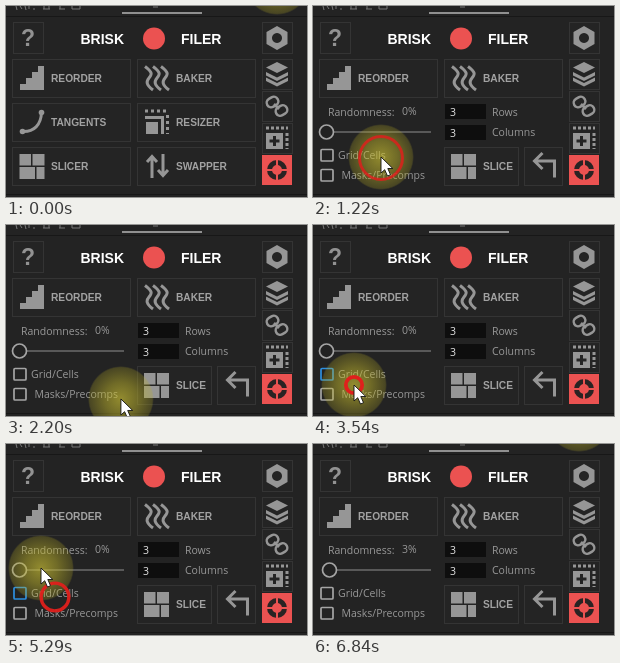
Write an HTML page that moves like this. It is 301 px wide and 191 px high and loops after 6940 ms.

```html
<!DOCTYPE html>
<html lang="en">
<head>
<meta charset="utf-8">
<title>Tool panel</title>
<style>
html, body { margin: 0; width: 100%; height: 100%; overflow: hidden; background: #232323; }
svg { display: block; width: 100vw; height: 100vh; }
text { font: 10.5px "Open Sans", "Noto Sans", sans-serif; fill: #989898; }
.label { font: bold 10.2px "Liberation Sans", Arial, sans-serif; fill: #a2a2a2; }
.title { font: bold 14px "Liberation Sans", Arial, sans-serif; fill: #fff; }
.help { font: bold 23px "Liberation Sans", Arial, sans-serif; fill: #929292; }
.field { fill: #e4e4e4; }
.btn { fill: #242424; stroke: #343434; }
.icon { fill: #969696; }
.line { fill: none; stroke: #969696; stroke-width: 3; }
.box { fill: #222; stroke: #a5a5a5; stroke-width: 1.7; }
</style>
</head>
<body>
<svg viewBox="0 0 301 191">
  <defs>
    <radialGradient id="shine">
      <stop offset="0" stop-color="#cdc236" stop-opacity=".66"/>
      <stop offset=".5" stop-color="#c4b92c" stop-opacity=".48"/>
      <stop offset=".95" stop-color="#bcb024" stop-opacity=".25"/>
      <stop offset="1" stop-color="#bcb024" stop-opacity="0"/>
    </radialGradient>
    <path id="tiles" d="M0 0h11.500v11.500h-11.500zM13 0h12v11.500h-12zM0 13h15.500v12h-15.500zM17 13h8v12h-8z"/>
  </defs>
  <rect width="301" height="191" fill="#232323"/>

  <!-- window edges -->
  <path d="M0 10.500H301M0 188.500H301" stroke="#171717"/>
  <path d="M10 0l1 4M14 0l2 3M19 0l1 4M23 0v3M28 2v2M37 3h7M38 0v3M43 0v3M53 3h6M54 0v3M66 3h8M66 0v3M74 0v3M147 1h5" stroke="#777"/>
  <path d="M116 7h80" stroke="#b4b4b4" stroke-width="1.600"/>

  <!-- header -->
  <rect class="btn" x="7.500" y="16.500" width="30" height="31"/>
  <text class="help" x="22" y="40" text-anchor="middle">?</text>
  <text class="title" x="118" y="38" text-anchor="end">BRISK</text>
  <circle cx="148" cy="32.500" r="11" fill="#eb5251"/>
  <text class="title" x="175" y="38">FILER</text>

  <!-- side bar -->
  <rect class="btn" x="256.500" y="16.500" width="30" height="31"/>
  <rect class="btn" x="256.500" y="53.500" width="30" height="30"/>
  <rect class="btn" x="256.500" y="85.500" width="30" height="30"/>
  <rect class="btn" x="256.500" y="117.500" width="30" height="30"/>
  <rect x="256" y="149" width="30" height="30" fill="#eb5251"/>
  <path class="icon" fill-rule="evenodd" d="M271 20l10.500 6v12l-10.500 6l-10.500-6v-12zM271 27a5 5 0 1 0 .01 0z"/>
  <g class="icon">
    <path d="M271 56l11 5.500l-11 5.500l-11-5.500z"/>
    <path id="sheet" d="M260 66l11 5.500l11-5.500v3.500l-11 5.500l-11-5.500z"/>
    <use href="#sheet" y="5.500"/>
  </g>
  <g class="line" style="stroke-width:2.500">
    <rect x="-6" y="-4.500" width="12" height="9" rx="4.500" transform="translate(266.500 96) rotate(-30)"/>
    <rect x="-6" y="-4.500" width="12" height="9" rx="4.500" transform="translate(275.500 104.500) rotate(-30)"/>
    <path d="M268 98l5 5"/>
  </g>
  <path class="line" stroke-dasharray="3 2" d="M260 122H282M281 127V143"/>
  <path class="icon" fill-rule="evenodd" d="M260 127h17v16h-17zM267 130v3.500h-3.500v3h3.500v3.500h3v-3.500h3.500v-3h-3.500v-3.500z"/>
  <circle cx="271" cy="164" r="7.500" fill="none" stroke="#292323" stroke-width="5"/>
  <path d="M271 153v7M271 168v7M260 164h7M275 164h7" stroke="#eb5251" stroke-width="2"/>

  <!-- first row of tools -->
  <rect class="btn" x="6.500" y="53.500" width="118" height="38"/>
  <rect class="btn" x="131.500" y="53.500" width="118" height="38"/>
  <path class="icon" d="M14 84v-6h6v-6h6v-6h6v-6h6v24z"/>
  <g class="line">
    <path id="wave" d="M139 60.500c8 6 7 8 4 11.500s-3 7 4 12"/>
    <use href="#wave" x="8"/>
    <use href="#wave" x="16"/>
  </g>
  <text class="label" x="45" y="76">REORDER</text>
  <text class="label" x="170" y="76">BAKER</text>

  <g id="menu">
    <rect class="btn" x="6.500" y="97.500" width="118" height="38"/>
    <rect class="btn" x="131.500" y="97.500" width="118" height="38"/>
    <rect class="btn" x="6.500" y="141.500" width="118" height="38" id="slicer"/>
    <rect class="btn" x="131.500" y="141.500" width="118" height="38"/>
    <path class="line" d="M16.500 125.500C28 126 35 119 35.500 106.500"/>
    <circle class="icon" cx="16.500" cy="125.500" r="2.800"/>
    <circle class="icon" cx="35.500" cy="106.500" r="2.800"/>
    <path class="line" stroke-dasharray="3 3" d="M139 105H163M161.500 109V128"/>
    <path class="line" d="M139 111.500H156.500V128"/>
    <path class="icon" d="M140 116h12v12h-12z"/>
    <use class="icon" href="#tiles" x="13.500" y="148"/>
    <path class="line" d="M146 172V150M141 156l5-5.500l5 5.500M157 148V170M152 164l5 5.500l5-5.500"/>
    <text class="label" x="45" y="120">TANGENTS</text>
    <text class="label" x="170" y="120">RESIZER</text>
    <text class="label" x="45" y="164">SLICER</text>
    <text class="label" x="170" y="164">SWAPPER</text>
  </g>

  <g id="options">
    <text x="15" y="109.500">Randomness:</text>
    <text x="89" y="109" id="percent">0%</text>
    <path d="M21 126H118" stroke="#6b6b6b" stroke-width="1.500"/>
    <circle class="box" id="handle" cy="126" r="7"/>
    <rect class="box" id="grid" x="8" y="143.500" width="12" height="11.500" rx="1"/>
    <rect class="box" x="8" y="163.500" width="12" height="11.500" rx="1"/>
    <text x="25" y="153">Grid/Cells</text>
    <text x="28.500" y="173">Masks/Precomps</text>
    <rect x="132" y="98" width="41" height="15" fill="#0e0e0e"/>
    <rect x="132" y="119" width="41" height="15" fill="#0e0e0e"/>
    <text class="field" x="137" y="109.500">3</text>
    <text class="field" x="137" y="130.500">3</text>
    <text x="179" y="109.500">Rows</text>
    <text x="179" y="130">Columns</text>
    <rect class="btn" x="131.500" y="141.500" width="74" height="38"/>
    <rect class="btn" x="211.500" y="141.500" width="38" height="38"/>
    <use class="icon" href="#tiles" x="138" y="148"/>
    <text class="label" x="170" y="164">SLICE</text>
    <path class="line" d="M241.500 171.500V155H221.500M229.500 147l-8 8l8 8"/>
  </g>

  <circle id="glow" r="33" fill="url(#shine)"/>
  <circle id="ring" fill="none" stroke="#e01f1c"/>
  <path id="cursor" d="M0 0V16L3.700 12.700L6.500 19L9.500 17.700L6.800 11.500H11.800Z" fill="#fff" stroke="#111" stroke-width=".9"/>
</svg>
<script>
const LOOP = 6940, BLUE = "#2d8fe0", GREY = "#a5a5a5";
const OPEN = 1010, FOCUS = 3400, DRAG = 5710, RELEASE = 6840;
const $ = id => document.getElementById(id);

// screen updates: [first, last] of each run of 70 ms steps
const runs = [[0, 700], [800, 2480], [2630, 6760], [6840, 6840]];
// pointer: time, x, y
const path = [
  [70, 271, -24], [660, 68, 151], [1430, 68, 151], [1780, 104, 104],
  [2180, 115, 174], [2480, 108, 172], [2630, 105, 170], [3400, 41, 160],
  [4030, 41, 160], [4600, 49, 153], [5150, 49, 153], [5290, 35, 124],
  [5710, 34, 126], [6000, 16, 118], [6130, 16, 118], [6690, 266, -25]
];
// clicks: time, x, y
const clicks = [[960, 68, 152], [3490, 41, 160], [5150, 49, 153], [DRAG, 34, 126]];

function step(t) {
  const [first, last] = runs.findLast(r => t >= r[0]);
  return Math.min(last, first + Math.floor((t - first) / 70) * 70);
}

function pointer(t) {
  const i = path.findIndex(p => p[0] > t);
  if (i < 1) return path.at(i).slice(1);
  const [a, b] = [path[i - 1], path[i]];
  const u = (t - a[0]) / (b[0] - a[0]), e = u * u * (3 - 2 * u);
  return [a[1] + (b[1] - a[1]) * e, a[2] + (b[2] - a[2]) * e];
}

function set(id, attrs) {
  for (const k in attrs) $(id).setAttribute(k, attrs[k]);
}

function draw(t) {
  const [x, y] = pointer(t), at = `translate(${x} ${y})`;
  set("glow", { transform: at });
  set("cursor", { transform: at });

  const click = clicks.findLast(c => t >= c[0]);
  const p = click ? (t - click[0]) / 600 : 1;
  set("ring", p < 1 ? {
    cx: click[1], cy: click[2], r: 5 + 38 * p,
    "stroke-width": 4 - 2.4 * p, opacity: 1 - .9 * p * p
  } : { opacity: 0 });

  const open = t >= OPEN;
  $("menu").style.display = open ? "none" : "";
  $("options").style.display = open ? "" : "none";
  $("slicer").style.fill = t >= 560 ? "#2b2b2b" : "";

  const value = Math.round(3 * Math.min(1, Math.max(0, (t - DRAG) / 210)));
  const held = t >= DRAG && t < RELEASE;
  $("percent").textContent = value + "%";
  set("handle", { cx: 13.5 + value });
  $("handle").style.stroke = held ? BLUE : GREY;
  $("handle").style.fill = held ? "#4c9fc4" : "#222";
  $("grid").style.stroke = t >= FOCUS && t < DRAG ? BLUE : GREY;
}

const start = performance.now();
function tick() {
  draw(step((performance.now() - start) % LOOP));
  requestAnimationFrame(tick);
}
tick();
</script>
</body>
</html>
```
